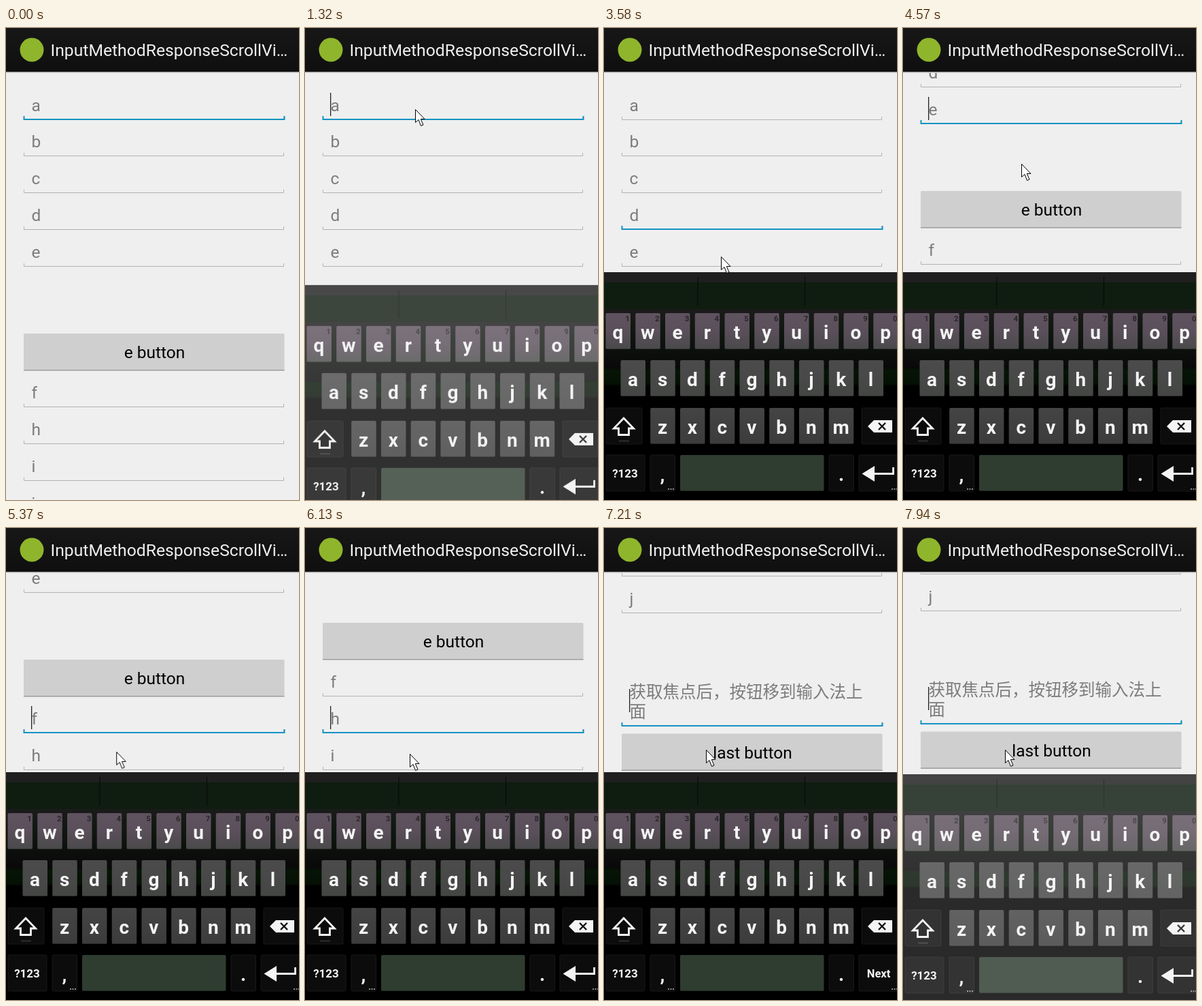
An HTML page that plays this animation: 431x692 px, repeating every 8000 ms.

```html
<!DOCTYPE html>
<html lang="en">
<head>
<meta charset="utf-8">
<title>Scroll view demo</title>
<style>
html, body { margin: 0; width: 100%; height: 100%; overflow: hidden; background: #efefef; }
svg { display: block; width: 431px; height: 692px; overflow: hidden; }
text { font: 24.5px Roboto, "Noto Sans CJK SC", sans-serif; }
.hint { fill: #7c7c7c; }
.line { fill: none; stroke: #b2b2b2; }
.label { fill: #f4f4f4; font-weight: 700; text-anchor: middle; }
.key { font-size: 28px; }
.small { font-size: 17px; }
.digit { font-size: 11.5px; fill: #2b262b; }
.btn { fill: #000; text-anchor: middle; }

.anim { animation: 8s linear infinite; }
#page { animation-name: scroll; animation-timing-function: ease-out; }
#focus { animation-name: focus; animation-timing-function: step-end; }
#caret { animation-name: blink; animation-timing-function: step-end; }
#cover { animation-name: cover; animation-timing-function: step-end; }
#board { animation-name: board; }
#next { animation-name: next; animation-timing-function: step-end; }
#enter { animation-name: enter; animation-timing-function: step-end; }
#mouse { animation-name: mouse; }

@keyframes scroll {
  0%, 51.6% { transform: translateY(0); }
  54.3%, 62.5% { transform: translateY(-209px); }
  65.6%, 71.25% { transform: translateY(-255px); }
  74.4%, 77.5% { transform: translateY(-309px); }
  80.6%, 81.9% { transform: translateY(-363px); }
  85%, 86.25% { transform: translateY(-550px); }
  89.4%, 95% { transform: translateY(-593px); }
  96%, 100% { transform: translateY(-596px); }
}
@keyframes focus {
  0% { transform: translateY(0); }
  25% { transform: translateY(53px); }
  31.9% { transform: translateY(107px); }
  38.1% { transform: translateY(161px); }
  51.6% { transform: translateY(215px); }
  62.5% { transform: translateY(421px); }
  71.25% { transform: translateY(475px); }
  77.5% { transform: translateY(529px); }
  81.9% { transform: translateY(583px); }
  86.25%, 100% { transform: translateY(749px); }
}
@keyframes blink {
  0%, 10%, 18.75%, 31.25%, 44.4%, 58.4%, 68.75% { opacity: 0; transform: none; }
  3.75%, 12.5%, 25%, 31.9%, 51.6%, 62.5%, 71.25% { opacity: 1; transform: none; }
  86.25%, 98.75%, 100% { opacity: 1; transform: translateY(-15px); }
  92.5% { opacity: 0; transform: translateY(-15px); }
}
@keyframes cover { 0% { opacity: 0; } 16%, 100% { opacity: 1; } }
@keyframes board {
  0%, 15.5% { opacity: 0; transform: translateY(34px); }
  16.5% { opacity: .8; transform: translateY(19px); }
  18.2%, 98% { opacity: 1; transform: none; }
  99.2%, 100% { opacity: .83; transform: translateY(3px); }
}
@keyframes next { 0%, 92.5%, 100% { opacity: 0; } 85% { opacity: 1; } }
@keyframes enter { 0%, 92.5%, 100% { opacity: 1; } 85% { opacity: 0; } }
@keyframes mouse {
  0%, 1.24% { opacity: 0; transform: translate(402px, 623px); }
  1.25% { opacity: 1; transform: translate(402px, 623px); }
  11.25%, 23.4% { transform: translate(162px, 119px); }
  25%, 26.5% { transform: translate(164px, 172px); }
  31.2%, 33% { transform: translate(168px, 232px); }
  37.5%, 39% { transform: translate(170px, 285px); }
  43.5% { transform: translate(172px, 333px); }
  44.7%, 54% { transform: translate(172px, 335px); }
  57.1%, 58.4% { transform: translate(174px, 199px); }
  62%, 64% { transform: translate(166px, 325px); }
  70.6% { transform: translate(158px, 331px); }
  76%, 78% { transform: translate(154px, 331px); }
  86%, 100% { opacity: 1; transform: translate(150px, 325px); }
}
</style>
</head>
<body>
<svg viewBox="0 0 431 692">
  <defs>
    <linearGradient id="bar" x2="0" y2="1"><stop stop-color="#171717"/><stop offset="1" stop-color="#0f0f0f"/></linearGradient>
    <linearGradient id="row0" x2="0" y2="1"><stop stop-color="#5f535f"/><stop offset=".5" stop-color="#5a4f5a"/><stop offset="1" stop-color="#4a4a4a"/></linearGradient>
    <linearGradient id="row1" x2="0" y2="1"><stop stop-color="#4b4b4b"/><stop offset="1" stop-color="#444644"/></linearGradient>
    <linearGradient id="row2" x2="0" y2="1"><stop stop-color="#444"/><stop offset="1" stop-color="#3c3c3c"/></linearGradient>
    <linearGradient id="back" x2="0" y2="1">
      <stop offset=".16" stop-color="#1b1b1b"/><stop offset=".25" stop-color="#101710"/>
      <stop offset=".42" stop-color="#090909"/><stop offset=".43" stop-color="#061406"/>
      <stop offset=".49" stop-color="#051005"/><stop offset=".5" stop-color="#000"/>
    </linearGradient>
  </defs>
  <rect width="431" height="692" fill="#efefef"/>

  <g id="page" class="anim">
    <g id="form"></g>
    <g id="focus" class="anim">
      <path d="M26.5 129V134H409.5V129" fill="none" stroke="#1593c3" stroke-width="2"/>
      <rect id="caret" class="anim" x="37" y="95" width="1.3" height="34" fill="#222"/>
    </g>
  </g>

  <rect width="431" height="64" fill="url(#bar)"/>
  <rect y="64" width="431" height="1" fill="#8e8e8e"/>
  <rect y="65" width="431" height="1" fill="#d4d4d4"/>
  <circle cx="38" cy="32" r="17.5" fill="#8fb52c"/>
  <text x="65.5" y="40.5" fill="#f0f0f0" style="font-size:24.7px">InputMethodResponseScrollVi…</text>

  <rect id="cover" class="anim" y="358" width="431" height="334" fill="#efefef"/>
  <g id="board" class="anim">
    <rect y="358" width="431" height="334" fill="url(#back)"/>
    <rect y="358" width="431" height="15" fill="#1f1f1f"/>
    <rect y="373" width="431" height="39" fill="#0f1c10"/>
    <path d="M138 365V407M295.5 365V407" stroke="#050805"/>
    <g id="keys"></g>
    <path d="M29 572L14.5 587H21.5V596.5H36.5V587H43.5Z" fill="none" stroke="#f4f4f4" stroke-width="2.8"/>
    <path d="M22 605.5H37" stroke="#2e2e2e" stroke-width="2"/>
    <path d="M388 584L397 575H424V593H397Z" fill="#f4f4f4"/>
    <path d="M404 579L414 589M414 579L404 589" stroke="#111" stroke-width="2.4"/>
    <g id="enter" class="anim">
      <path d="M379.500 653.500L398 642V665Z" fill="#f4f4f4"/>
      <path d="M396 653.500H425.500V644" fill="none" stroke="#f4f4f4" stroke-width="2.8"/>
    </g>
    <text id="next" class="anim label" x="404" y="659" style="font-size:16.500px">Next</text>
    <path d="M94 676H103M423 676H432" stroke="#bbb" stroke-width="1.6" stroke-dasharray="2 1.500"/>
  </g>

  <path id="mouse" class="anim" d="M.5.5V19.500L5 15.500L8.500 24.500L12 23L8.300 14.500H14Z" fill="#fff" stroke="#000"/>
</svg>
<script>
const text = (x, y, cls, s) => `<text x="${x}" y="${y}" class="${cls}">${s}</text>`;
const rect = (x, y, w, h, fill, extra = '') =>
  `<rect x="${x}" y="${y}" width="${w}" height="${h}" fill="${fill}" ${extra}/>`;

// Form: underlined fields and two buttons
const underline = y => `<path class="line" d="M26.5 ${y - 4}V${y + .5}H408.500V${y - 4}"/>`;
const field = (y, s) => underline(y) + text(37.5, y - 12, 'hint', s);
const button = (y, s) =>
  rect(26, y, 383.5, 54, '#cfcfcf', 'rx="1.500"') +
  rect(26, y + 53, 383.5, 1.5, '#9c9c9c') +
  text(218.5, y + 36, 'btn', s);

const lines = { a: 134, b: 187, c: 241, d: 295, e: 349, f: 555, h: 609, i: 663, j: 717 };
document.getElementById('form').innerHTML =
  Object.entries(lines).map(([s, y]) => field(y, s)).join('') +
  button(448, 'e button') +
  text(37.5, 842, 'hint', '获取焦点后，按钮移到输入法上') +
  field(883, '面') +
  button(894.5, 'last button');

// Keyboard
const PITCH = 43.75, rowTop = r => 418 + Math.round(69.4 * r);
const cap = (x, r, w, fill) =>
  rect(x, rowTop(r), w, 53, fill, 'rx="2"') +
  rect(x + 1, rowTop(r) + 52, w - 2, 1, '#000', 'opacity=".35"');
const dark = (x, r, w) =>
  rect(x, rowTop(r), w, 53, '#0c0c0c', 'rx="2" stroke="#191919"');

let keys = '';
[['qwertyuiop', 2.5], ['asdfghjkl', 24.5], ['zxcvbnm', 68.2]].forEach(([row, left], r) => {
  [...row].forEach((ch, i) => {
    const x = left + PITCH * i;
    keys += cap(x, r, 36.5, `url(#row${r})`) + text(x + 18, rowTop(r) + 38, 'label key', ch);
    if (r === 0) keys += text(x + 32, rowTop(r) + 12, 'label digit', (i + 1) % 10);
  });
});
keys += dark(3, 2, 53) + dark(379, 2, 56) +
  dark(3, 3, 57) + dark(68, 3, 36.5) + dark(331, 3, 36.5) + dark(375, 3, 60) +
  cap(112, 3, 211.5, '#2f3c30') +
  text(31, 659, 'label small', '?123') +
  text(86, 664, 'label key', ',') + text(349, 664, 'label key', '.');
document.getElementById('keys').innerHTML = keys;
</script>
</body>
</html>
```
